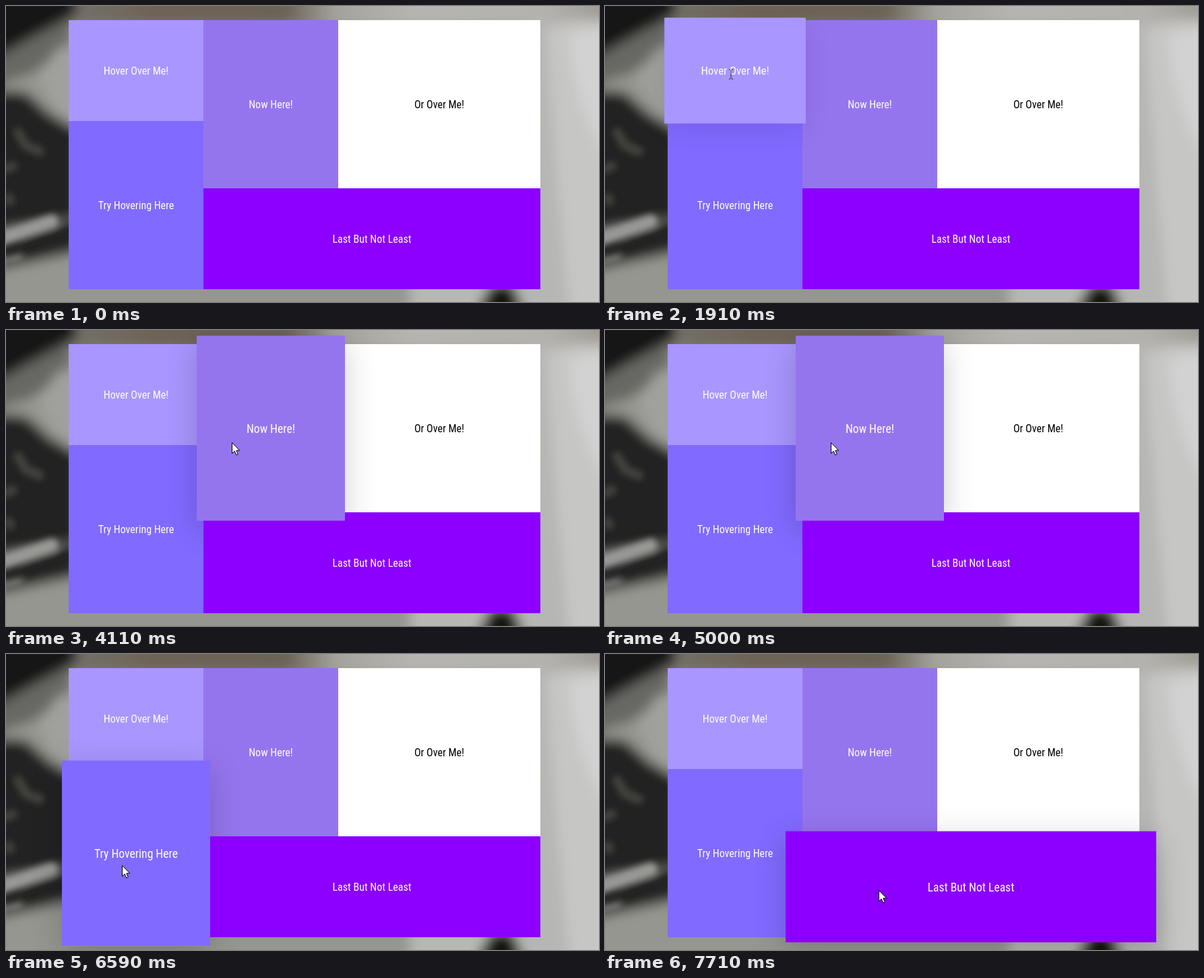
An HTML page for the animation above (8000 ms loop, 880 by 440 pixels).

```html
<!DOCTYPE html>
<html lang="en">
<head>
<meta charset="utf-8">
<title>Hover tiles</title>
<style>
@property --p { syntax: "<number>"; inherits: false; initial-value: 0; }

html, body { margin: 0; width: 100%; height: 100%; overflow: hidden; }
.stage { position: relative; width: 880px; height: 440px; overflow: hidden; background: #95968f; }
.photo { position: absolute; inset: 0; }

.tile, .shadow {
  position: absolute;
  left: var(--x); top: var(--y); width: var(--w); height: var(--h);
  transform: scale(calc(1 + .1 * var(--p)));
  animation: var(--grow, none) 8s ease infinite, var(--lift, none) 8s step-end infinite;
}
.tile {
  display: flex; align-items: center; justify-content: center;
  z-index: 0; color: #fff; white-space: nowrap;
  font: 400 16px "Roboto Condensed", Roboto, sans-serif;
  font-stretch: 75%;
}
.shadow {
  z-index: 1; opacity: var(--p);
  box-shadow: 0 10px 40px rgba(0, 0, 0, .19);
  animation: var(--grow) 8s ease infinite;
}
.a { --x: 93px; --y: 21px; --w: 200px; --h: 150px; --grow: growA; --lift: liftA; }
.d { --x: 93px; --y: 171px; --w: 200px; --h: 250px; --grow: growD; --lift: liftD; }
.b { --x: 293px; --y: 21px; --w: 200px; --h: 250px; --grow: growB; --lift: liftB; }
.c { --x: 493px; --y: 21px; --w: 300px; --h: 250px; }
.e { --x: 293px; --y: 271px; --w: 500px; --h: 150px; --grow: growE; }
.tile.a { background: #a996ff; }
.tile.d { background: #816aff; }
.tile.b { background: #9575ee; }
.tile.c { background: #fff; color: #000; }
.tile.e { background: #8b00ff; z-index: 2; }

@keyframes growA { 0%, 21.75% { --p: 0 } 29.25%, 43.875% { --p: 1 } 51.375%, 100% { --p: 0 } }
@keyframes growB { 0%, 43.875% { --p: 0 } 51.375%, 68.75% { --p: 1 } 76.25%, 100% { --p: 0 } }
@keyframes growD { 0%, 68.75% { --p: 0 } 76.25%, 88.9% { --p: 1 } 96.4%, 100% { --p: 0 } }
@keyframes growE { 0%, 88.9% { --p: 0 } 96.4%, 100% { --p: 1 } }

/* the hovered tile is in front of all others */
@keyframes liftA { 0% { z-index: 0 } 21.75% { z-index: 3 } 43.875%, 100% { z-index: 0 } }
@keyframes liftB { 0% { z-index: 0 } 43.875% { z-index: 3 } 68.75%, 100% { z-index: 0 } }
@keyframes liftD { 0% { z-index: 0 } 68.75% { z-index: 3 } 88.9%, 100% { z-index: 0 } }

.cursor {
  position: absolute; left: 0; top: 0; z-index: 5; overflow: visible;
  animation: move 8s linear infinite;
}
.arrow { animation: arrow 8s step-end infinite; }
.beam { animation: beam 8s step-end infinite; }

@keyframes move {
  0%, 11.24% { transform: translate(-40px, 47px) }
  11.25%, 11.62% { transform: translate(4px, 47px) }
  11.625% { transform: translate(54px, 54px) }
  16.625% { transform: translate(54px, 54px); animation-timing-function: cubic-bezier(.6, 0, .8, .6) }
  23.75%, 37.25% { transform: translate(187px, 101px) }
  43.625% { transform: translate(315px, 145px); animation-timing-function: ease-out }
  47.5% { transform: translate(335px, 167px) }
  62.5% { transform: translate(335px, 167px); animation-timing-function: cubic-bezier(.6, 0, .7, .7) }
  72.25% { transform: translate(172px, 314px) }
  82.375% { transform: translate(172px, 314px); animation-timing-function: cubic-bezier(.5, 0, .5, 1) }
  91.5%, 100% { transform: translate(406px, 351px) }
}
@keyframes arrow { 0% { opacity: 1 } 23.1% { opacity: 0 } 39.5%, 100% { opacity: 1 } }
@keyframes beam { 0% { opacity: 0 } 23.1% { opacity: 1 } 39.5%, 100% { opacity: 0 } }
</style>
</head>
<body>
<div class="stage">
  <svg class="photo" width="880" height="440" viewBox="0 0 880 440">
    <defs>
      <filter id="soft" filterUnits="userSpaceOnUse" x="-60" y="-60" width="1000" height="560">
        <feGaussianBlur stdDeviation="9"/>
      </filter>
      <filter id="fine" filterUnits="userSpaceOnUse" x="-60" y="-60" width="1000" height="560">
        <feGaussianBlur stdDeviation="5"/>
      </filter>
      <linearGradient id="top" gradientUnits="userSpaceOnUse" x1="95" x2="880" y1="0" y2="0">
        <stop offset="0" stop-color="#74716a"/>
        <stop offset=".15" stop-color="#6d6456"/>
        <stop offset=".41" stop-color="#6b6356"/>
        <stop offset=".5" stop-color="#a3a29b"/>
        <stop offset=".65" stop-color="#b6b5b0"/>
        <stop offset=".9" stop-color="#b3b2ad"/>
        <stop offset="1" stop-color="#a09d95"/>
      </linearGradient>
    </defs>
    <g filter="url(#soft)">
      <path d="M-50-50H930V490H-50Z" fill="#95968f"/>
      <path d="M80-50H930V30H80Z" fill="url(#top)"/>
      <path d="M600 300H930V490H600Z" fill="#b7b7b4"/>
      <path d="M770 25H930V490H770Z" fill="#b6b6b4"/>
      <path d="M803 36Q830 14 930 24V490H840Q815 260 803 36Z" fill="#c6c6c5"/>
      <path d="M835 45Q870 28 930 40V270Q850 200 835 45Z" fill="#d2d2d2"/>
      <path d="M690 470L720 412H752L775 470Z" fill="#17130f"/>
      <path d="M-50 50L95 10V60L40 100L-50 130Z" fill="#686864"/>
      <path d="M-50-50H105V12L30 52L-50 98Z" fill="#171918"/>
      <path d="M48 104L80 60H110V180L75 155Z" fill="#a0a19d"/>
      <path d="M-50 122L30 128L65 160L110 185V315L-50 340Z" fill="#222322"/>
      <path d="M-50 350L110 318V365L-50 400Z" fill="#252625"/>
    </g>
    <g filter="url(#fine)" fill="none" stroke-linecap="round">
      <path d="M-20 350L68 320" stroke="#999a96" stroke-width="20"/>
      <path d="M-20 384L20 374" stroke="#777873" stroke-width="10"/>
      <path d="M32 357L95 335" stroke="#222322" stroke-width="16"/>
      <path d="M18 188L30 208L50 216M0 242L10 238M4 285L6 290" stroke="#42423d" stroke-width="14"/>
    </g>
  </svg>

  <div class="tile a">Hover Over Me!</div>
  <div class="tile d">Try Hovering Here</div>
  <div class="tile b">Now Here!</div>
  <div class="tile c">Or Over Me!</div>
  <div class="tile e">Last But Not Least</div>
  <div class="shadow a"></div>
  <div class="shadow d"></div>
  <div class="shadow b"></div>
  <div class="shadow e"></div>

  <svg class="cursor" width="14" height="20">
    <path class="arrow" d="M.5.5V16.5L4.2 13L6.7 18.8L9.2 17.7L6.8 12H11.7Z" fill="#fff" stroke="#000"/>
    <path class="beam" d="M-3-6.5H-1M1-6.5H3M0-6V7M-3 7.5H-1M1 7.5H3" fill="none" stroke="#222"/>
  </svg>
</div>
</body>
</html>
```
